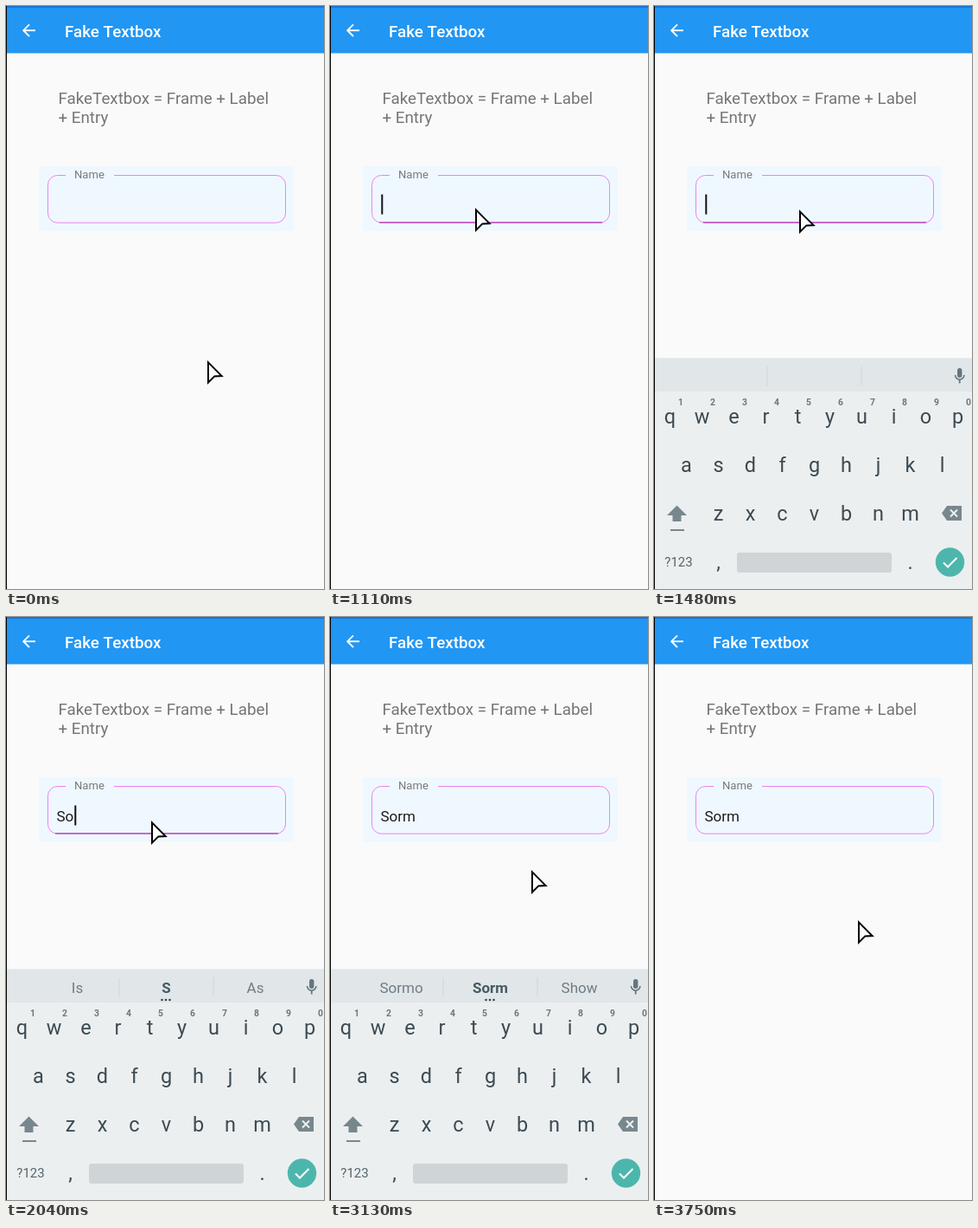
Recreate the animation shown at these times as an HTML page with a canvas. Size 368 by 673 pixels, loop 5.09 s.

```html
<!DOCTYPE html>
<html lang="en">
<head>
<meta charset="utf-8">
<title>Fake Textbox</title>
<style>
  html, body { margin: 0; width: 100%; height: 100%; overflow: hidden; background: #fafafa; }
  canvas { display: block; width: 368px; height: 673px; }
</style>
</head>
<body>
<canvas id="stage" width="368" height="673"></canvas>
<script>
const W = 368, H = 673, LOOP = 5090;
const stage = document.getElementById('stage').getContext('2d');
const panel = document.createElement('canvas');
panel.width = W;
panel.height = H;
const keys = panel.getContext('2d');

const clamp = v => Math.min(1, Math.max(0, v));
const smooth = p => p * p * p * (p * (p * 6 - 15) + 10);
const lerp = (a, b, p) => a + (b - a) * p;
// Latest entry [time, value] that has begun.
const latest = (list, t) => list.filter(e => e[0] <= t).pop()[1];

function text(c, str, x, y, size, color, weight = 400, align = 'left') {
  c.font = `${weight} ${size}px Roboto, sans-serif`;
  c.fillStyle = color;
  c.textAlign = align;
  c.fillText(str, x, y);
}

function rect(c, x, y, w, h, color, r = 0) {
  c.fillStyle = color;
  c.beginPath();
  c.roundRect(x, y, w, h, r);
  c.fill();
}

function trace(c, pts, close) {
  c.beginPath();
  pts.forEach(([x, y]) => c.lineTo(x, y));
  if (close) c.closePath();
}

function line(c, pts, color, width) {
  trace(c, pts);
  c.strokeStyle = color;
  c.lineWidth = width;
  c.stroke();
}

function shape(c, pts, color) {
  trace(c, pts, true);
  c.fillStyle = color;
  c.fill();
}

const typed = [[0, ''], [1810, 'S'], [2040, 'So'], [2100, 'Sor'], [2150, 'Sorm']];
const hints = [
  [0, null],
  [1860, ['Is', 'S', 'As']],
  [2180, ['Some', 'Sor', 'Show']],
  [2320, ['Sormo', 'Sorm', 'Show']]
];
const caret = [[0, false], [980, true], [1620, false], [1810, true], [2800, false]];

// Pointer legs: start, end, steps, target position.
const legs = [
  [360, 880, 12, 168, 233],
  [1210, 1210, 1, 168, 235],
  [2750, 2980, 5, 233, 292],
  [3460, 3750, 7, 236, 350]
];

function pointerAt(t) {
  let x = 233, y = 409;
  for (const [start, end, steps, tx, ty] of legs) {
    if (t < start) break;
    const p = clamp((t - start) / (end - start || 1));
    const e = smooth((Math.floor(p * (steps - 1)) + 0.8) / (steps - 0.2));
    x = lerp(x, tx, e);
    y = lerp(y, ty, e);
  }
  return [Math.round(x), Math.round(y)];
}

function drawPointer(t) {
  const [x, y] = pointerAt(t);
  const pts = [[1, 2.4], [1, 25.6], [8.3, 18.4], [16.6, 18]].map(([a, b]) => [x + a, y + b]);
  trace(stage, pts, true);
  stage.fillStyle = '#fcfcfc';
  stage.fill();
  stage.strokeStyle = '#000';
  stage.lineWidth = 2;
  stage.lineJoin = 'miter';
  stage.stroke();
}

function drawPage() {
  rect(stage, 0, 0, W, H, '#fafafa');
  rect(stage, 0, 0, W, 54.6, '#2196f3');
  rect(stage, 0, 0, W, 2, '#1976d2');
  line(stage, [[34, 28.2], [20.5, 28.2]], '#fff', 1.9);
  line(stage, [[27, 21.4], [20.2, 28.2], [27, 35]], '#fff', 1.9);
  text(stage, 'Fake Textbox', 68, 36, 18.8, '#fff', 500);
  text(stage, 'FakeTextbox = Frame + Label', 60.5, 113, 18.8, '#757575');
  text(stage, '+ Entry', 60.5, 135, 18.8, '#757575');
}

function drawField(t) {
  rect(stage, 38, 185, 295, 75, '#f0f8ff');
  stage.strokeStyle = '#ee82ee';
  stage.lineWidth = 1;
  stage.beginPath();
  stage.roundRect(48.5, 195.5, 275, 54.7, 11);
  stage.stroke();
  rect(stage, 69, 194, 56, 3, '#f0f8ff');
  text(stage, 'Name', 79, 199, 13.1, '#7a7a7a');

  const focused = t >= 980 && t < 3130;
  if (focused) rect(stage, 57, 249, 258, 1.7, '#bf62c4');

  const value = latest(typed, t);
  text(stage, value, 58.5, 236, 17, '#1c1c1c');
  const width = stage.measureText(value).width;
  if (t >= 2320 && focused) rect(stage, 59, 237.5, width, 1, '#333');
  if (latest(caret, t)) rect(stage, 59.3 + Math.round(width), 217.5, 2, 23, '#111');
}

function drawMic() {
  const c = '#66757c', x = 353.7;
  rect(keys, x - 2.7, 418, 5.4, 11, c, 2.7);
  keys.beginPath();
  keys.arc(x, 426, 5.2, 0, Math.PI);
  keys.strokeStyle = c;
  keys.lineWidth = 1.6;
  keys.stroke();
  line(keys, [[x, 431], [x, 435.5]], c, 1.8);
}

function drawHints(t) {
  rect(keys, 0, 406, W, 1, '#eceeef');
  rect(keys, 0, 407, W, 38, '#e1e6e9');
  [131, 240].forEach(x => rect(keys, x - 0.5, 416, 1, 22, '#cfd6da'));
  drawMic();
  const words = latest(hints, t);
  if (!words) return;
  words.forEach((word, i) => {
    const mid = i === 1;
    text(keys, word, 82.5 + i * 103, 433.5, 17, mid ? '#455a64' : '#6f7d84', mid ? 700 : 400, 'center');
  });
  [180.5, 185, 189.5].forEach(x => rect(keys, x - 1.3, 440.7, 2.6, 2.6, '#37474f', 1.3));
}

function drawKeys() {
  const ink = '#3c4b53', soft = '#78878e';
  rect(keys, 0, 445, W, 300, '#eceff0');
  [['qwertyuiop', 18.5], ['asdfghjkl', 37.5], ['zxcvbnm', 74.5]].forEach(([row, x0], r) => {
    [...row].forEach((ch, i) => text(keys, ch, x0 + i * 37, 482 + r * 56, 23.5, ink, 400, 'center'));
  });
  [...'1234567890'].forEach((n, i) => text(keys, n, 31 + i * 37, 461, 10.4, '#6a7980', 700, 'center'));

  shape(keys, [[26.5, 576.5], [38, 588], [31.5, 588], [31.5, 595], [21.5, 595], [21.5, 588], [15, 588]], soft);
  rect(keys, 19, 604, 16, 2, soft);

  shape(keys, [[333, 585.5], [339, 577], [356, 577], [356, 594], [339, 594]], soft);
  line(keys, [[343, 581.5], [351, 589.5]], '#eceff0', 1.9);
  line(keys, [[351, 581.5], [343, 589.5]], '#eceff0', 1.9);

  text(keys, '?123', 28.5, 647, 15, '#55646b', 400, 'center');
  text(keys, ',', 74.5, 650, 23.5, ink, 400, 'center');
  text(keys, '.', 296.5, 650, 23.5, ink, 400, 'center');
  rect(keys, 96, 631, 179, 23, '#cfd4d7', 3);
  rect(keys, 325.8, 625.3, 33.4, 33.4, '#4db6ac', 16.7);
  line(keys, [[335, 642.5], [340, 647.5], [350.5, 637]], '#fff', 2);
}

// Fades while sliding, decelerating in and accelerating out.
function drawKeyboard(t) {
  const enter = 1 - (1 - clamp((t - 1190) / 250)) ** 2;
  const leave = clamp((t - 3130) / 190) ** 2;
  const shown = t < 1210 ? 0 : enter - leave;
  if (shown <= 0) return;
  keys.clearRect(0, 0, W, H);
  keys.save();
  keys.translate(0, Math.round(60 * (1 - shown)));
  drawHints(t);
  drawKeys();
  keys.restore();
  stage.globalAlpha = shown;
  stage.drawImage(panel, 0, 0);
  stage.globalAlpha = 1;
}

function render(now) {
  const t = now % LOOP;
  drawPage();
  drawField(t);
  drawKeyboard(t);
  drawPointer(t);
  rect(stage, 0, 0, 1, H, '#000');
}

const begin = performance.now();
function tick() {
  render(performance.now() - begin);
  requestAnimationFrame(tick);
}
tick();
</script>
</body>
</html>
```
